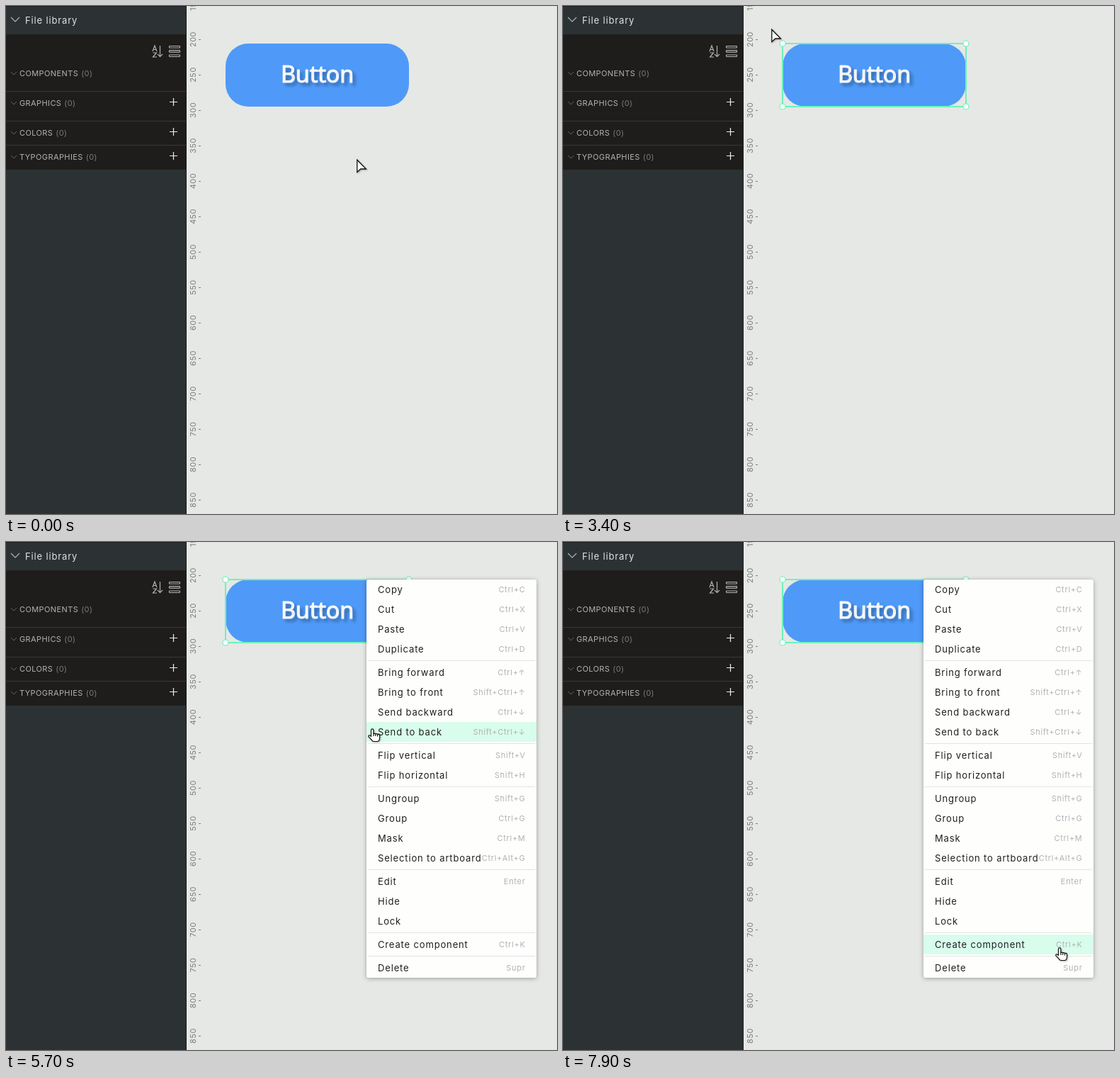
An HTML page for the animation above (8 s loop, 778x717 px).

```html
<!DOCTYPE html>
<html lang="en">
<head>
<meta charset="utf-8">
<title>Create component</title>
<style>
  html, body { margin: 0; width: 100%; height: 100%; overflow: hidden; background: #e6e8e5; }
  svg { display: block; }
  text { font-family: Inter, "Noto Sans", sans-serif; font-size: 13px; letter-spacing: .85px; }
  .head { fill: #e3e3e3; }
  .title { font-size: 11px; letter-spacing: .4px; fill: #b1b2b5; }
  .count { fill: #7b7c7f; }
  .mark { font-size: 11px; letter-spacing: .5px; fill: #7b7d80; text-anchor: middle; }
  .label { font: 400 32.5px "Noto Sans", "Open Sans", sans-serif; letter-spacing: -.2px; fill: #fff;
    stroke: #fff; stroke-width: 1px; text-anchor: middle; text-shadow: 4px 4px 4px rgba(0, 0, 0, .25); }
  .item { fill: #1f1f1f; }
  .key { font-size: 11px; letter-spacing: .7px; fill: #b1b2b5; text-anchor: end; }
  .icon { fill: none; stroke: #b1b2b5; stroke-width: 1.2; }
  .accent { fill: none; stroke: #6cf3ba; }
  #marquee { fill: rgba(112, 250, 190, .14); }
  #panel { filter: drop-shadow(0 1px 3px rgba(0, 0, 0, .32)); }
  #arrow, #hand { filter: drop-shadow(1px 1px 1px rgba(0, 0, 0, .3)); }
</style>
</head>
<body>
<svg width="778" height="717" viewBox="0 0 778 717">
  <rect width="778" height="717" fill="#e6e8e5"/>
  <g id="ruler"></g>

  <rect width="255" height="717" fill="#2c3133"/>
  <rect y="40" width="255" height="191" fill="#1f1d1b"/>
  <path d="M0 .5H254.5V717" fill="none" stroke="#1c1d1d"/>
  <path class="icon" d="M7 16l6 6 6-6"/>
  <text class="head" x="27" y="25">File library</text>
  <g class="icon">
    <path d="M207 64l3-8 3 8M208 61.5h4M207.5 66h5l-5 6h5.5M217.5 56v15.5M214 68l3.500 3.500 3.500-3.500"/>
    <rect x="230.500" y="56.500" width="15" height="2.500" rx=".8"/>
    <rect x="230.500" y="62.700" width="15" height="2.500" rx=".8"/>
    <rect x="230.500" y="69" width="15" height="2.500" rx=".8"/>
  </g>
  <g id="library"></g>

  <rect x="310" y="53" width="259" height="89" rx="32" fill="#4f9af8"/>
  <text class="label" x="439.5" y="108">Button</text>
  <rect id="outline" class="accent" x="310" y="53" width="259" height="89"/>
  <g id="selection" class="accent">
    <rect x="310" y="53" width="259" height="89" stroke-width="2"/>
    <g fill="#fff" stroke-width="1.2">
      <circle cx="310" cy="53" r="4"/><circle cx="569" cy="53" r="4"/>
      <circle cx="310" cy="142" r="4"/><circle cx="569" cy="142" r="4"/>
    </g>
  </g>
  <rect id="marquee" class="accent"/>

  <g id="menu">
    <rect id="panel" x="509" y="53" width="240" height="562" rx="3" fill="#fefefd"/>
    <rect id="hot" x="509" width="240" height="28" fill="#d8fdec"/>
    <g id="items"></g>
  </g>

  <path id="arrow" d="M.8 1.200V18.600L5.800 14H13.400Z" fill="#fff" stroke="#111" stroke-width="1.3"/>
  <g id="hand" fill="#fff" stroke="#111" stroke-width="1.2" stroke-linejoin="round">
    <path d="M4.500 10.500V2.500a1.700 1.700 0 0 1 3.400 0V7.500q1.500-1 2.900.3 1.600-.7 2.800.6 2.800-.5 3 1.900V13q0 4.800-3 5.500H8q-2-.4-3-2.500L1.200 12.200q-1-1.900.6-2.300 1.200-.2 2.700 1.600z"/>
    <path d="M8 7.500V11M10.800 8V11M13.600 8.500V11.500" fill="none"/>
  </g>
</svg>
<script>
const $ = id => document.getElementById(id);
const show = (id, on) => $(id).style.display = on ? '' : 'none';

// Ruler
for (let v = 150; v <= 850; v += 50) {
  const y = v - 153;
  $('ruler').innerHTML += `<text class="mark" transform="translate(268 ${y}) rotate(-90)">${v}</text>
    <path d="M272 ${y + .5}h3" stroke="#7b7d80"/>`;
}

// Library sections: name, centre line, rule above
const sections = [['COMPONENTS', 95], ['GRAPHICS', 137, 120], ['COLORS', 179, 162], ['TYPOGRAPHIES', 213, 196]];
for (const [name, y, rule] of sections) {
  $('library').innerHTML += `<path d="M7 ${y - 2}l4 4 4-4" fill="none" stroke="#626466"/>
    <text class="title" x="19" y="${y + 4}">${name}<tspan class="count" dx="4">(0)</tspan></text>` +
    (rule ? `<path d="M0 ${rule + .5}H254" stroke="#34373a"/>
    <path d="M231 ${y - 1.5}h11m-5.5-5.5v11" stroke="#eee" stroke-width="1.2"/>` : '');
}

// Context menu: groups are parted by a rule
const groups = [
  ['Copy|Ctrl+C', 'Cut|Ctrl+X', 'Paste|Ctrl+V', 'Duplicate|Ctrl+D'],
  ['Bring forward|Ctrl+↑', 'Bring to front|Shift+Ctrl+↑', 'Send backward|Ctrl+↓', 'Send to back|Shift+Ctrl+↓'],
  ['Flip vertical|Shift+V', 'Flip horizontal|Shift+H'],
  ['Ungroup|Shift+G', 'Group|Ctrl+G', 'Mask|Ctrl+M', 'Selection to artboard|Ctrl+Alt+G'],
  ['Edit|Enter', 'Hide|', 'Lock|'],
  ['Create component|Ctrl+K'],
  ['Delete|Supr']
];
const rows = [];
let rowY = 53, markup = '';
groups.forEach((group, i) => {
  if (i) {
    markup += `<path d="M511 ${rowY + 2.5}H747" stroke="#e3e3e3"/>`;
    rowY += 5;
  }
  for (const entry of group) {
    const [name, key] = entry.split('|');
    markup += `<text class="item" x="525" y="${rowY + 19}">${name}</text>
      <text class="key" x="733.5" y="${rowY + 17.5}">${key}</text>`;
    rows.push(rowY);
    rowY += 28;
  }
});
$('items').innerHTML = markup;

// Pointer moves: start and end in tenths of a second, then where to
const moves = [
  [2, 6, 417, 112], [9, 14, 398, 47],                                         // over the button, above it
  [14, 17, 612, 185], [17, 19, 637, 180], [19, 20, 617, 172],                 // to the marquee's corner
  [21, 25, 400, 60], [25, 30, 294, 32],                                       // drag
  [34, 36, 590, 100], [37, 41, 459, 49], [41, 44, 508, 52],                   // to the menu's corner
  [47, 48, 531, 124], [48, 49, 532, 72], [50, 51, 556, 91],                   // first entries
  [53, 59, 505, 285], [59, 61, 526, 408], [61, 62, 541, 392], [62, 71, 541, 573],
  [71, 74, 601, 574], [75, 78, 708, 569], [78, 79, 695, 572]                  // along "Create component"
];
const easeOut = k => k * (2 - k);

function pointer(t) {
  let x = 495, y = 216;
  for (const [start, end, toX, toY] of moves) {
    if (t <= start) break;
    const k = easeOut(Math.min(1, (t - start) / (end - start)));
    x += (toX - x) * k;
    y += (toY - y) * k;
  }
  return [Math.round(x), Math.round(y)];
}

function draw(t) {
  const [x, y] = pointer(t);
  const dragging = t >= 22 && t < 34;
  const inside = x >= 310 && x <= 569 && y >= 53 && y <= 142;
  const hand = t >= 48;

  show('outline', t < 34 && (dragging || inside));
  show('selection', t >= 34);
  show('marquee', dragging);
  if (dragging) {
    const box = { x: x + 3, y: y + 1, width: 600 - x, height: 166 - y };
    for (const side in box) $('marquee').setAttribute(side, box[side]);
  }

  show('menu', t >= 44);
  show('hot', t >= 46);
  $('hot').setAttribute('y', rows.filter(r => r <= y + 12).pop() ?? rows[0]);

  show('arrow', !hand);
  show('hand', hand);
  $(hand ? 'hand' : 'arrow').setAttribute('transform', `translate(${x} ${y})`);
}

let last = -1;
function tick() {
  const t = Math.floor(performance.now() % 8000 / 100);
  if (t !== last) draw(last = t);
  requestAnimationFrame(tick);
}
tick();
</script>
</body>
</html>
```
